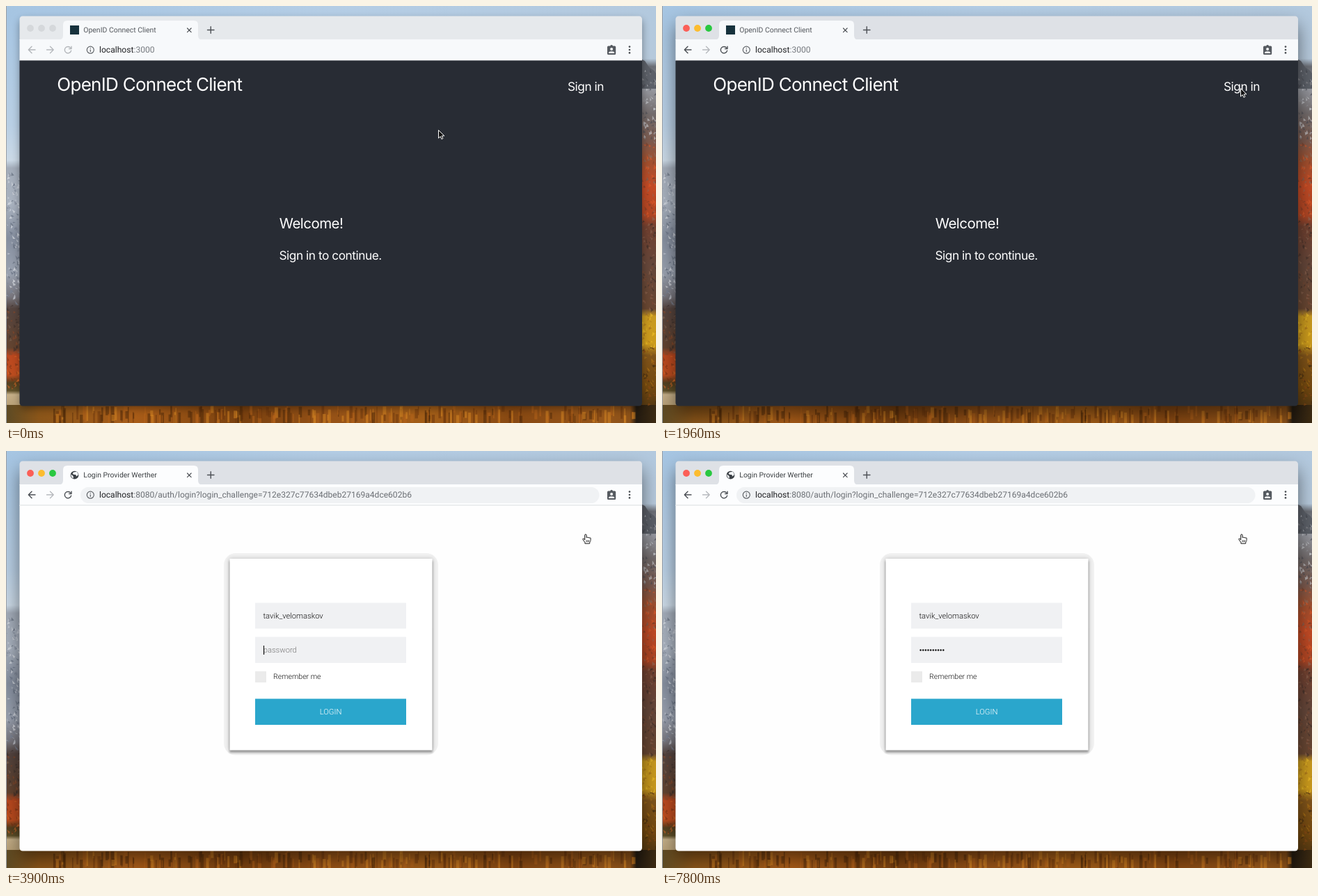
An HTML page that plays this animation: 934x600 px, repeating every 8 s.

```html
<!DOCTYPE html>
<html lang="en">
<head>
<meta charset="utf-8">
<title>Sign-in flow</title>
<style>
  html, body { margin: 0; width: 100%; height: 100%; overflow: hidden; background: #282c34; }
  svg { display: block; width: 934px; height: 600px; }
  text { text-rendering: geometricPrecision; white-space: pre; }
  .chrome { font-family: Roboto, Arial, sans-serif; }
  .app { font-family: Inter, "Open Sans", sans-serif; fill: #fff; }
  .form { font-family: Roboto, Arial, sans-serif; font-weight: 300; font-size: 11.2px; }
  .line { fill: none; stroke-linecap: round; stroke-linejoin: round; }
</style>
</head>
<body>
<svg viewBox="0 0 934 600" xmlns="http://www.w3.org/2000/svg">
  <defs>
    <linearGradient id="sky">
      <stop offset="0" stop-color="#a6c5e2"/><stop offset=".5" stop-color="#b4cde5"/><stop offset="1" stop-color="#b3c9de"/>
    </linearGradient>
    <linearGradient id="left" x2="0" y2="1"></linearGradient>
    <linearGradient id="right" x2="0" y2="1"></linearGradient>
    <linearGradient id="lake"></linearGradient>
    <filter id="soft" x="-20%" y="-20%" width="140%" height="140%"><feGaussianBlur stdDeviation="6"/></filter>
    <filter id="wide" x="-20%" y="-20%" width="140%" height="140%"><feGaussianBlur stdDeviation="13"/></filter>
    <filter id="near" x="-20%" y="-20%" width="140%" height="140%"><feGaussianBlur stdDeviation="1.8"/></filter>
    <filter id="halo" x="-20%" y="-20%" width="140%" height="140%"><feGaussianBlur stdDeviation="3.2"/></filter>
    <clipPath id="frame"><rect x="19.5" y="14.5" width="894.5" height="561" rx="4.5"/></clipPath>
  </defs>

  <rect width="934" height="600" fill="url(#sky)"/>
  <rect y="14" width="60" height="562" fill="url(#left)"/>
  <rect x="880" y="14" width="54" height="562" fill="url(#right)"/>
  <path d="M912 76l6 3 6 9 10 7v24h-22z" fill="#5c6068"/>
  <rect y="574" width="934" height="26" fill="url(#lake)"/>
  <g id="texture"></g>

  <rect id="shadowIdle" x="20" y="20" width="894" height="559" rx="5" fill="#000" opacity=".38" filter="url(#soft)"/>
  <rect id="shadowActive" x="20" y="27" width="894" height="559" rx="5" fill="#000" opacity=".5" filter="url(#wide)"/>
  <rect width="1" height="600" fill="#9a9fa6"/>

  <g clip-path="url(#frame)">
    <rect id="strip" x="19" y="14" width="896" height="35"/>
    <g id="bar">
      <path d="M76 48.5q6 0 6-6V27q0-6 6-6h182q6 0 6 6v15.5q0 6 6 6z"/>
      <rect x="19" y="48" width="896" height="31"/>
    </g>
    <g id="lights"></g>
    <g class="line" stroke="#4c5055">
      <path d="M260.500 32l5.600 5.600m0-5.600l-5.600 5.600" stroke-width="1.200"/>
      <path d="M289.500 34.500h9.500m-4.750-4.750v9.500" stroke-width="1.400"/>
    </g>
    <rect id="pill" x="107" y="52" width="745.500" height="23" rx="11.500" fill="#f0f2f4"/>
    <g id="nav" class="line" stroke-width="1.400">
      <path d="M42 63H32.500m4.500-4.800L32.300 63l4.700 4.800"/>
      <path d="M92.800 60.300a4.700 4.700 0 1 0 .8 4m.4-6.100v3.400h-3.500"/>
    </g>
    <path class="line" d="M58.500 63H68m-4.500-4.800l4.700 4.800-4.700 4.800" stroke="#b7babe" stroke-width="1.400"/>
    <g stroke="#5f6368" stroke-width="1.200" fill="none">
      <circle cx="121.300" cy="63.200" r="5"/>
      <path d="M121.300 62.400v3.500m0-5.800v1.200"/>
    </g>
    <path d="M865.500 57.500h2.700a2 2 0 0 1 3.800 0h2.700q1.500 0 1.500 1.500v9.500q0 1.500-1.500 1.500h-9.200q-1.500 0-1.500-1.500V59q0-1.500 1.500-1.500z" fill="#555a60"/>
    <g fill="#f8fafb"><circle cx="870.100" cy="62" r="2"/><path d="M866 68v-.8q0-2 4.100-2t4.100 2v.8z"/></g>
    <g fill="#4c5055"><circle cx="896" cy="58.600" r="1.350"/><circle cx="896" cy="63" r="1.350"/><circle cx="896" cy="67.400" r="1.350"/></g>

    <g id="home">
      <rect x="92" y="28" width="13" height="13" fill="#17323d"/>
      <g class="chrome">
        <text x="111.300" y="38.200" font-size="10.450" fill="#54585d">OpenID Connect Client</text>
        <text x="134" y="67.200" font-size="12.100" fill="#202124">localhost<tspan fill="#777b80">:3000</tspan></text>
      </g>
      <rect x="19" y="78.400" width="896" height="498" fill="#282c34"/>
      <g class="app">
        <text x="73.300" y="122" font-size="26" letter-spacing="-.72">OpenID Connect Client</text>
        <text x="392.800" y="320" font-size="20.500" letter-spacing="-.55">Welcome!</text>
        <text x="392.500" y="364.700" font-size="17.300" letter-spacing="-.47">Sign in to continue.</text>
        <rect id="ring" x="805.500" y="102" width="56" height="26.500" rx="1.500" fill="none" stroke="#1a4da6" stroke-width="3"/>
        <text id="signIn" x="807" y="122" font-size="17.300" letter-spacing="-.47">Sign in</text>
      </g>
    </g>

    <g id="login">
      <circle cx="98.500" cy="34.700" r="5.900" fill="#3c4146"/>
      <path d="M93.500 33.500l3.200 2.700v3.300q-3-1.200-3.200-4zM97 30.500l4.500-.7q2.300 1.700 2.300 4.500l-2.300 2.200-1.500-2.400h-2.600l-1.800-1.600z" fill="#f4f6f8"/>
      <g class="chrome">
        <text x="111.300" y="38.200" font-size="10.400" fill="#3c4043">Login Provider Werther</text>
        <text x="134" y="67.200" font-size="12.050" fill="#202124">localhost<tspan fill="#6b6f74">:8080/auth/login?login_challenge=712e327c77634dbeb27169a4dce602b6</tspan></text>
      </g>
      <rect x="19" y="78" width="896" height="498" fill="#fefefe"/>
      <rect x="19" y="77.500" width="896" height="1" fill="#dcdfe2"/>
      <rect x="313" y="147" width="308" height="290.500" rx="17" fill="#f1f1f1"/>
      <rect x="321" y="155" width="292" height="275.500" fill="#000" opacity=".22" filter="url(#halo)"/>
      <rect x="321" y="158.500" width="292" height="275.500" fill="#000" opacity=".3" filter="url(#near)"/>
      <rect x="321.500" y="155" width="291" height="275.500" fill="#fff"/>
      <g fill="#f0f1f3">
        <rect x="358" y="218.500" width="217" height="37"/>
        <rect x="358" y="267.500" width="217" height="37.500"/>
      </g>
      <rect x="358" y="317" width="16" height="16" fill="#ebebeb"/>
      <rect x="358" y="356.500" width="217" height="37.500" fill="#2aa6cc"/>
      <g class="form" fill="#111">
        <text x="369.500" y="241">tavik_velomaskov</text>
        <text id="hint" x="369.700" y="290" fill="#757575">password</text>
        <text x="384" y="328.300" style="font-size:10.550px">Remember me</text>
        <text x="466.500" y="379.300" text-anchor="middle" fill="#fff">LOGIN</text>
      </g>
      <g id="bullets" fill="#111"></g>
      <rect id="caret" y="280" width="1" height="13" fill="#000"/>
    </g>
  </g>

  <path id="arrow" d="M.5 .7V12.200L3.200 9.700 4.900 13.500 6.800 12.700 5.200 8.900H8.900z" fill="#111" stroke="#fff" stroke-linejoin="round"/>
  <g id="hand" transform="translate(828.300 119.300)" stroke="#111" stroke-linejoin="round">
    <path d="M3.400 8.600L2.200 7.200C1 6 0 7 .9 8.400L3.600 12.200v1.600h6.800v-1.400C11.400 11 11.800 9.600 11.800 8V6.400C11.800 5.200 10 5.200 9.800 6 9.600 4.800 8 4.800 7.800 5.600 7.600 4.600 6 4.400 5.800 5.200V1.800C5.800.2 3.400.2 3.400 1.800z" fill="#fff"/>
    <path d="M5.700 9v2.700M7.500 9v2.700M9.300 9v2.700" stroke-width=".8"/>
  </g>
</svg>
<script>
const DURATION = 8000, ACTIVATE = 1960, HOVER = 2700, LOGIN = 2850;
const $ = id => document.getElementById(id);

// Cursor steps: [time, x, y].
const moves = [[0, 621, 178], [500, 658, 175], [650, 728, 162], [790, 784, 140],
  [940, 807, 128], [1090, 822, 121], [1240, 828, 119], [1390, 831, 118]];
// Key presses: [time, caret x].
const keys = [[4800, 374], [4950, 377], [5100, 381], [5550, 384], [5700, 389],
  [6000, 392], [6300, 396], [6450, 399], [6900, 403], [7200, 406]];
const caretOff = [[3300, 3900], [4350, 4800], [7800, DURATION]];

function add(parent, tag, attrs) {
  const el = document.createElementNS('http://www.w3.org/2000/svg', tag);
  for (const name in attrs) el.setAttribute(name, attrs[name]);
  return parent.appendChild(el);
}

function gradient(id, stops) {
  for (const stop of stops.split(', ')) {
    const [offset, color] = stop.split(' ');
    add($(id), 'stop', { offset: offset + '%', 'stop-color': color });
  }
}

let seed = 7;
function random(min, max) {
  seed = (seed * 16807) % 2147483647;
  return min + (max - min) * seed / 2147483647;
}

// Small slanted facets that roughen a stretch of the landscape.
function facets(x, y0, y1, colors) {
  for (let i = 0; i < (y1 - y0) * .6; i++) {
    const px = random(x, x + 20), py = random(y0, y1);
    const d = `M${px} ${py}l${random(1, 5)} ${random(1, 5)}l${random(-5, -1)} ${random(0, 3)}z`;
    add($('texture'), 'path', { d, fill: colors[i % colors.length], opacity: .6 });
  }
}

function buildScene() {
  gradient('left', '0 #a6c5e2, 28 #b9cfe4, 37 #cbd9e6, 39 #a3acb9, 48 #a9b2bf, 57 #858e9e, 66 #9aa2b0, 72 #77757c, 75 #54443f, 85 #62432f, 87 #bb481f, 92 #bd4d1f, 94 #54401f, 96 #5f5029, 97 #c4ae87, 100 #b79f76');
  gradient('right', '0 #b3c9de, 11 #b6c9db, 13 #6a6d74, 19 #96989f, 25 #726b6b, 32 #7b5a4e, 37 #a0502f, 44 #c24a25, 51 #b04624, 54 #704030, 64 #65473a, 75 #684631, 77 #c8991f, 84 #cc9b1c, 87 #80541a, 95 #74490f, 100 #553912');
  gradient('lake', '0 #5c4a24, 5 #8a5519, 20 #a85c18, 36 #78400f, 50 #965217, 65 #a35e18, 78 #874812, 92 #96561a, 96 #8a5018, 97 #221a10, 100 #3c2a12');
  facets(0, 235, 430, ['#d5dbe3', '#5d6778', '#e6eaef', '#7b8494']);
  facets(0, 430, 500, ['#3a2f2c', '#7f6452', '#8a4a2a']);
  facets(0, 500, 550, ['#dc6a28', '#7a3516']);
  facets(914, 90, 195, ['#d0d3d9', '#484a52', '#8f8f95']);
  facets(914, 195, 305, ['#dd5a2a', '#7d3d28', '#8f6a5a']);
  facets(914, 305, 440, ['#3f2e28', '#8d6650', '#7a4a34']);
  facets(914, 440, 490, ['#f0c02a', '#a5701a']);
  facets(914, 490, 572, ['#a87018', '#3f2a10', '#8a4a16']);
  for (let i = 0; i < 230; i++) {
    add($('texture'), 'rect', {
      x: random(60, 900), y: random(574, 590), width: random(1, 5), height: random(8, 26),
      fill: ['#dc8a24', '#4a2609', '#b8641a', '#6b350d'][i % 4], opacity: .5
    });
  }
  for (let i = 0; i < 3; i++) add($('lights'), 'circle', { cx: 35 + 16 * i, cy: 32, r: 4.9 });
  for (let i = 0; i < keys.length; i++) {
    add($('bullets'), 'circle', { cx: 371.6 + 3.63 * i, cy: 286.4, r: 1.25 });
  }
}

const show = (id, visible) => $(id).style.display = visible ? '' : 'none';
const latest = (steps, t) => steps.filter(step => step[0] <= t).pop();

function render(t) {
  const active = t >= ACTIVATE, hover = t >= HOVER, login = t >= LOGIN;

  show('shadowIdle', !active);
  show('shadowActive', active);
  $('strip').setAttribute('fill', active ? '#dee1e6' : '#e6e9ec');
  $('bar').setAttribute('fill', login ? '#fcfdfe' : '#f7f9fb');
  $('nav').setAttribute('stroke', active ? '#4c5055' : '#b3b6ba');
  [...$('lights').children].forEach((light, i) =>
    light.setAttribute('fill', active ? ['#fb5f57', '#fcbc2f', '#29c840'][i] : '#d5d8db'));

  show('home', !login);
  show('login', login);
  show('pill', login);
  show('ring', hover);
  $('signIn').setAttribute('text-decoration', hover ? 'underline' : 'none');

  const typed = keys.filter(key => key[0] <= t).length;
  show('hint', !typed);
  [...$('bullets').children].forEach((bullet, i) => bullet.style.display = i < typed ? '' : 'none');
  $('caret').setAttribute('x', typed ? keys[typed - 1][1] : 370);
  show('caret', !caretOff.some(([from, to]) => t >= from && t < to));

  const [, x, y] = latest(moves, t);
  $('arrow').setAttribute('transform', `translate(${x} ${y})`);
  show('arrow', !hover);
  show('hand', hover);
}

buildScene();
const start = performance.now();
function tick() {
  render((performance.now() - start) % DURATION);
  requestAnimationFrame(tick);
}
tick();
</script>
</body>
</html>
```
